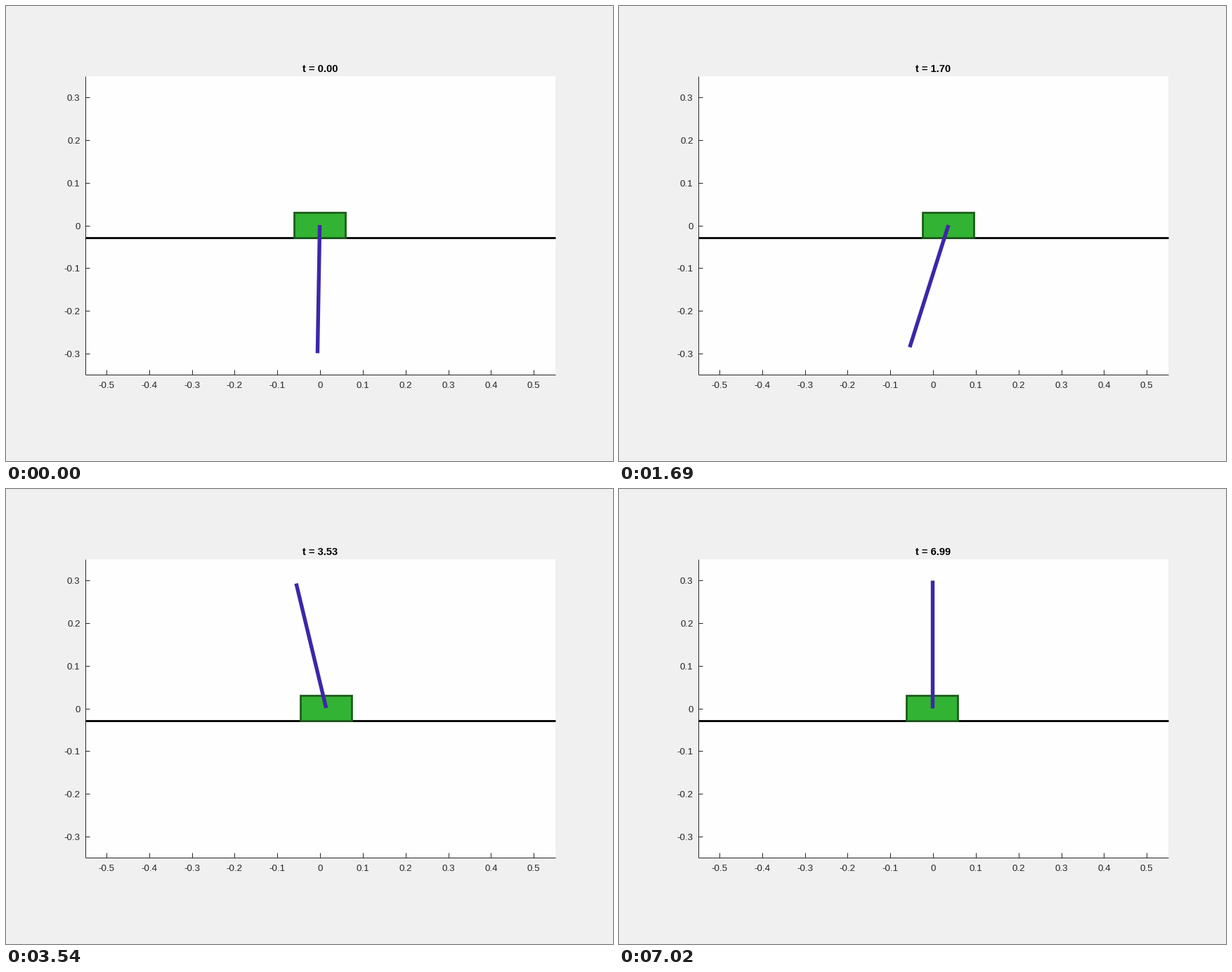
A matplotlib script for the animation above (7040 ms loop, 864x648 px).

```python
import math

import numpy as np
import matplotlib.pyplot as plt
from matplotlib.animation import FuncAnimation
from matplotlib.collections import LineCollection
from matplotlib.patches import Rectangle

W, H, DPI = 864, 648, 100
LOOP, STEP = 7040, 10
PT = 72 / DPI                       # points per pixel
X0, Y0, UNIT = 446.6, 312.0, 608.3  # world origin and scale in pixels
LEFT, RIGHT, TOP, BOTTOM = 112.5, 781.5, 100, 524.5
POLE, CART_W, CART_H = 0.3, 0.12, 0.06
INK = (0.15, 0.15, 0.15)

plt.rcParams["font.family"] = "Liberation Sans"

# Turning points of the swing-up: (seconds, value)
CART = [(0, 0), (.53, -.235), (1.2, .1), (1.8, .032), (2.6, -.045),
        (3.52, .015), (4.45, -.0074), (5.65, .004), (6.55, -.004), (7.5, .0017)]
# Degrees from hanging down, positive to the right
ANGLE = [(0, -1), (.33, 46), (.74, -93), (1.31, 108), (2.03, -116),
         (2.73, 125), (3.653, -180)]


def swing(points, t):
    """Cosine ease from one turning point to the next, then hold."""
    for (t0, v0), (t1, v1) in zip(points, points[1:]):
        if t < t1:
            s = (t - t0) / (t1 - t0)
            return v0 + (v1 - v0) * (1 - math.cos(math.pi * s)) / 2
    return points[-1][1]


def sim_time(ms):
    """Simulated seconds; the picture steps every 20 ms."""
    if ms < 210:
        return 0.0
    if ms < 2340:
        shown = min(210 + (ms - 210) // 20 * 20, 2310)
    else:
        shown = 2340 + (ms - 2340) // 20 * 20
    return float(np.interp(shown, [210, 2190, 7020], [.25, 2.187, 6.986]))


def px(x):
    return X0 + UNIT * x


def py(y):
    return Y0 - UNIT * y


def label(x, y, text, size=13.33, color=INK, ha="center", **kw):
    return ax.text(x, y, text, size=size * PT, color=color, ha=ha,
                   va="baseline", **kw)


fig = plt.figure(figsize=(W / DPI, H / DPI), dpi=DPI, facecolor="#f0f0f0")
ax = fig.add_axes([0, 0, 1, 1])
ax.set_xlim(0, W)
ax.set_ylim(H, 0)
ax.axis("off")

ax.add_patch(Rectangle((LEFT, TOP), RIGHT - LEFT, BOTTOM - TOP,
                       fc="#fefefe", lw=0, zorder=0))

rules = [[(LEFT, TOP), (LEFT, BOTTOM)], [(LEFT, BOTTOM), (RIGHT, BOTTOM)]]
for k in range(-5, 6):
    x = math.floor(px(k / 10)) + .5
    rules.append([(x, BOTTOM), (x, BOTTOM - 6.5)])
    label(px(k / 10) + .4, 544.4, f"{k / 10:g}")
for k in range(-3, 4):
    y = math.floor(py(k / 10)) + .5
    rules.append([(LEFT, y), (LEFT + 6.5, y)])
    label(105.5, y + 5.2, f"{k / 10:g}", ha="right")
ax.add_collection(LineCollection(rules, colors=[INK], linewidths=PT, zorder=1))

ax.plot([LEFT, RIGHT], [py(-CART_H / 2)] * 2, color="black", lw=2.8 * PT,
        solid_capstyle="butt", zorder=2)
cart = ax.add_patch(Rectangle((0, py(CART_H / 2)), UNIT * CART_W, UNIT * CART_H,
                              fc=(.2, .7, .2), ec=(.1, .35, .1), lw=2.7 * PT,
                              joinstyle="miter", zorder=3))
pole, = ax.plot([], [], color="#3e26a8", lw=5.4 * PT,
                solid_capstyle="butt", zorder=4)
title = label(447.5, 94.1, "", 14.67, "black", weight="bold")


def draw(i):
    t = sim_time(i * STEP)
    x = swing(CART, t)
    a = math.radians(swing(ANGLE, t))
    cart.set_x(px(x - CART_W / 2))
    pole.set_data([px(x), px(x + POLE * math.sin(a))],
                  [py(0), py(-POLE * math.cos(a))])
    title.set_text(f"t = {t:.2f}")
    return cart, pole, title


anim = FuncAnimation(fig, draw, frames=LOOP // STEP, interval=STEP,
                     repeat=True, repeat_delay=0, blit=False)
plt.show()
```
